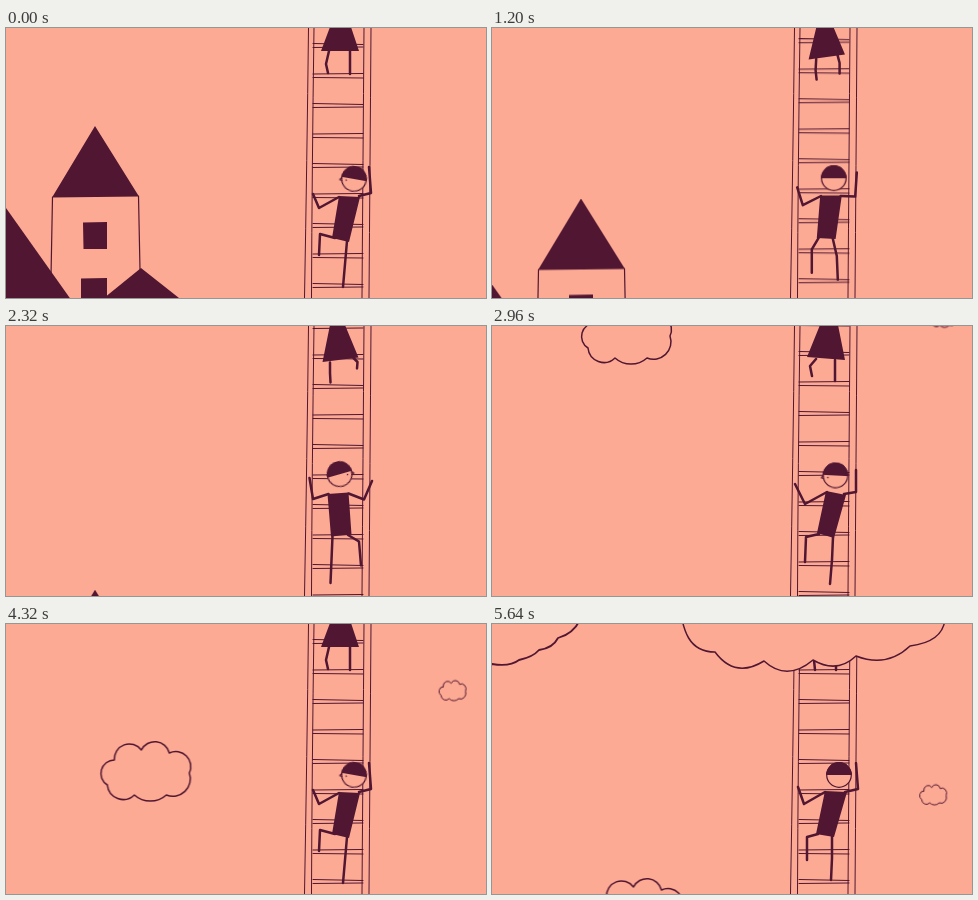
An HTML page without scripts that plays this animation: 480 px wide and 270 px high, repeating every 5.68 s.

```html
<!DOCTYPE html>
<html lang="en">
<head>
<meta charset="utf-8">
<title>Climbing the ladder</title>
<style>
:root { --sky: #fcaa94; --ink: #511631; }
html, body { margin: 0; width: 100%; height: 100%; overflow: hidden; background: var(--sky); }
svg { display: block; width: 100vw; height: 100vh; }

.ink { fill: var(--ink); }
.line { fill: none; stroke: var(--ink); stroke-width: 1.2; stroke-linecap: round; stroke-linejoin: round; }
.ladder { stroke-width: 1; }
.limbs { stroke-width: 2.5; }
.cloud { fill: var(--sky); stroke-width: 1.5; }
.far .cloud { stroke-width: 1; }
.corner .cloud { stroke-width: 1.8; }
#puff { vector-effect: non-scaling-stroke; }

/* One climbing cycle covers two rungs; four cycles make a loop. */
.rungs, .limbs, .bodies, .head, .face, .features { animation: 1420ms steps(1) infinite; }
.rungs { animation-name: rungs; }
.limbs { animation-name: limbs; }
.bodies { animation-name: bodies; }
.head { animation-name: head; }
.face { animation-name: face; }
.features { animation-name: features; }

/* Scenery crosses once per loop. */
.houses, .left-house, .near, .far, .top, .corner { animation: 5680ms steps(1) infinite; }
.houses { animation-name: houses; }
.left-house { animation-name: lag; }
.near { animation-name: near; }
.far { animation-name: far; }
.top { animation-name: top; }
.corner { animation-name: corner; }

@keyframes rungs {
  0% { transform: translateY(0); }
  5.634% { transform: translateY(10px); animation-timing-function: steps(2); }
  16.901% { transform: translateY(19.5px); animation-timing-function: steps(5); }
  45.07% { transform: translateY(30px); }
  50.704% { transform: translateY(35px); }
  56.338% { transform: translateY(38px); animation-timing-function: steps(2); }
  67.606% { transform: translateY(48px); animation-timing-function: steps(5); }
  95.775%, 100% { transform: translateY(60px); }
}
@keyframes head {
  0%, 100% { transform: translate(348px, 151px); }
  5.634% { transform: translate(343.5px, 149.5px); animation-timing-function: steps(2); }
  16.901% { transform: translate(338px, 150px); animation-timing-function: steps(5); }
  45.07%, 50.704% { transform: translate(333.3px, 148px); }
  56.338% { transform: translate(333.3px, 147.5px); animation-timing-function: steps(2); }
  67.606% { transform: translate(334px, 149px); animation-timing-function: steps(5); }
  95.775% { transform: translate(347px, 151px); }
}
/* He tilts his head and turns to the other side. */
@keyframes face {
  0%, 100% { transform: rotate(10deg); }
  5.634% { transform: rotate(3deg); }
  33.803% { transform: scaleX(-1) rotate(8deg); }
  50.704% { transform: scaleX(-1) rotate(16deg); }
  67.606% { transform: scaleX(-1) rotate(5deg); }
  78.873% { transform: rotate(0deg); }
}
@keyframes features {
  0%, 50.704%, 100% { opacity: 1; }
  33.803%, 78.873% { opacity: 0; }
}
/* Torso, then dress. */
@keyframes bodies {
  0%, 100% { d: path("M333 168L354 169L343 214L326 210ZM324 -1L345 -1L353 23L315 23Z"); }
  5.634% { d: path("M334 165L354 169L342 212L325 207ZM328 -1L346 -1L353 34L315 31Z"); animation-timing-function: steps(2); }
  16.901% { d: path("M328 167L349 168L344 210L326 208ZM333 -1L345 -1L351 45L317 32Z"); animation-timing-function: steps(5); }
  45.07% { d: path("M323 167L342 166L343 209L326 213ZM322 -1L347 -1L354 22L315 22Z"); }
  50.704% { d: path("M321 168L343 167L345 207L325 212ZM323 -1L344 -1L353 27L314 25Z"); }
  56.338% { d: path("M322 168L343 166L345 209L324 211ZM323 -1L342 -1L352 31L314 28Z"); animation-timing-function: steps(2); }
  67.606% { d: path("M321 168L342 167L346 208L326 210ZM325 -1L336 -1L353 32L319 44Z"); animation-timing-function: steps(5); }
  95.775% { d: path("M333 167L355 168L342 213L324 210ZM324 -1L345 -1L353 23L315 23Z"); }
}
/* His arms and legs, then her legs and hand. */
@keyframes limbs {
  0%, 100% { d: path("M307 166L313 180L333 169M363 139L365 165L353 168M329 210L314 206L313 227M341 213L339 236L337 259M323 23L320 36L322 45M344 23L344 35L344 46M312 -9L325 -9"); }
  5.634% { d: path("M303 158L313 178L335 166M364 144L364 166L352 168M327 208L314 211L313 236M341 211L340 234L338 258M324 33L318 40L320 50M343 34L343 44L343 55M312 -9L325 -9"); animation-timing-function: steps(2); }
  16.901% { d: path("M303 154L310 174L328 168M365 154L360 173L348 168M328 209L317 219L313 245M341 209L341 232L339 258M322 34L316 35L316 45M344 43L344 52L343 61M313 0L325 3"); animation-timing-function: steps(5); }
  45.07% { d: path("M305 139L305 166L324 168M363 164L356 181L342 167M326 212L324 235L323 258M341 209L354 206L354 226M324 22L323 34L323 46M344 22L347 35L345 43M312 -9L325 -9"); }
  50.704% { d: path("M304 145L305 168L322 169M364 162L357 178L343 169M326 211L324 235L322 258M343 207L355 210L355 231M323 26L323 38L323 49M347 27L350 35L347 41M312 -9L325 -9"); }
  56.338% { d: path("M303 150L305 173L322 168M366 157L357 173L343 167M325 211L324 234L322 256M342 209L354 212L354 234M322 30L322 42L322 53M347 30L350 37L349 40M312 -9L325 -9"); animation-timing-function: steps(2); }
  67.606% { d: path("M304 154L309 173L323 168M366 153L359 174L342 168M328 209L327 234L327 258M342 209L352 219L356 245M326 43L326 52L327 60M348 34L353 35L353 45M343 3L355 0"); animation-timing-function: steps(5); }
  95.775% { d: path("M306 163L312 180L333 168M364 139L366 165L353 168M326 210L315 213L315 236M340 212L340 234L339 256M323 23L322 36L323 46M344 23L344 35L344 46M312 -9L325 -9"); }
}

@keyframes houses {
  0% { transform: translateY(0); animation-timing-function: steps(9); }
  12.676% { transform: translateY(42px); animation-timing-function: steps(12); }
  29.577% { transform: translateY(103px); animation-timing-function: steps(3); }
  33.803% { transform: translateY(125px); animation-timing-function: steps(7); }
  43.662%, 100% { transform: translateY(182px); }
}
@keyframes lag {
  0% { transform: translateY(0); animation-timing-function: steps(9); }
  12.676%, 100% { transform: translateY(4px); }
}
@keyframes near {
  0% { transform: translate(-2px, -122px); }
  43.662% { transform: translate(-2px, -122px); animation-timing-function: steps(6); }
  52.113% { transform: translate(-2px, -73px); animation-timing-function: steps(9); }
  64.789% { transform: translate(0, 0); animation-timing-function: steps(12); }
  81.69% { transform: translate(5px, 99px); animation-timing-function: steps(8); }
  87.324% { transform: translate(7.5px, 132px); animation-timing-function: steps(17); }
  99.296%, 100% { transform: translate(9.5px, 203px); }
}
@keyframes far {
  0% { transform: translate(452px, -20px); }
  47.887% { transform: translate(452px, -20px); animation-timing-function: steps(3); }
  52.113% { transform: translate(451px, -8.5px); animation-timing-function: steps(9); }
  64.789% { transform: translate(447px, 26.5px); animation-timing-function: steps(12); }
  81.69% { transform: translate(446px, 87px); animation-timing-function: steps(8); }
  87.324% { transform: translate(446px, 110px); animation-timing-function: steps(17); }
  99.296%, 100% { transform: translate(441px, 171px); }
}
@keyframes top {
  0% { transform: translateY(-90px); }
  80.282% { transform: translateY(-72px); animation-timing-function: steps(10); }
  87.324% { transform: translateY(-42.5px); animation-timing-function: steps(17); }
  99.296%, 100% { transform: translateY(0); }
}
@keyframes corner {
  0% { transform: translate(-60px, -70px); }
  80.282% { transform: translate(-56px, -40px); animation-timing-function: steps(10); }
  87.324% { transform: translate(-35px, -22px); animation-timing-function: steps(17); }
  99.296%, 100% { transform: translate(0, 0); }
}
</style>
</head>
<body>
<svg viewBox="0 0 480 270">
  <defs>
    <path id="pair" d="M307 15.500l50 1M307 19.500l50-.5M307 46l50-.5M307 49.500l50 .5"/>
    <path id="puff" d="M105 70A15 15 0 0 1 132 60A15 15 0 0 1 160 63A15 15 0 0 1 180 83A17.500 17.500 0 0 1 157 105A24 24 0 0 1 125 105A16 16 0 0 1 98 95A13.500 13.500 0 0 1 105 70Z"/>
  </defs>

  <g class="houses">
    <path class="line" d="M46.500 169L44.500 275M132.500 168L134 242"/>
    <path class="ink" d="M89 98L133 168.500L46 169.500ZM77 194.500L101 194V221H77.500ZM75 250.500L101 250V277H75ZM135 240L173 270L186 280H86L98 270Z"/>
    <path class="ink left-house" d="M0 180L78 290H0Z"/>
  </g>

  <g class="near"><use href="#puff" class="line cloud"/></g>
  <g class="far">
    <g transform="scale(.3 .34) translate(-136 -82)"><use href="#puff" class="line cloud"/></g>
  </g>

  <path class="line ladder" d="M302.500 0Q301 130 298.500 270M308 0Q306 140 305.500 270M358 0Q357 130 356 270M365 0Q364 140 363 270"/>
  <g class="line ladder rungs">
    <use href="#pair" y="-60"/>
    <use href="#pair"/>
    <use href="#pair" y="60"/>
    <use href="#pair" y="120"/>
    <use href="#pair" y="180"/>
    <use href="#pair" y="240"/>
  </g>

  <path class="ink bodies"/>
  <path class="line limbs"/>
  <g class="head">
    <g class="face">
      <circle class="line" r="12.300" style="fill: var(--sky)"/>
      <path class="ink" d="M-12.900 0A12.900 12.900 0 0 1 12.900 0Z"/>
      <g class="features">
        <circle class="ink" cx="-7.500" cy="2.500" r=".8"/>
        <path class="line" d="M-12.300 1L-14 3L-12 3.500"/>
      </g>
    </g>
  </g>

  <g class="top">
    <path class="line cloud" d="M186 -30C190 10 198 28 223 28Q243 55 272 37Q295 58 321 36Q345 50 364 32Q395 44 418 22Q450 18 453 -4V-90H186Z"/>
  </g>
  <g class="corner">
    <path class="line cloud" d="M-50 20Q-20 44 0 40Q18 43 27 36Q41 33 47 26Q61 24 66 14Q81 10 88 -4V-60H-50Z"/>
  </g>
</svg>
</body>
</html>
```
